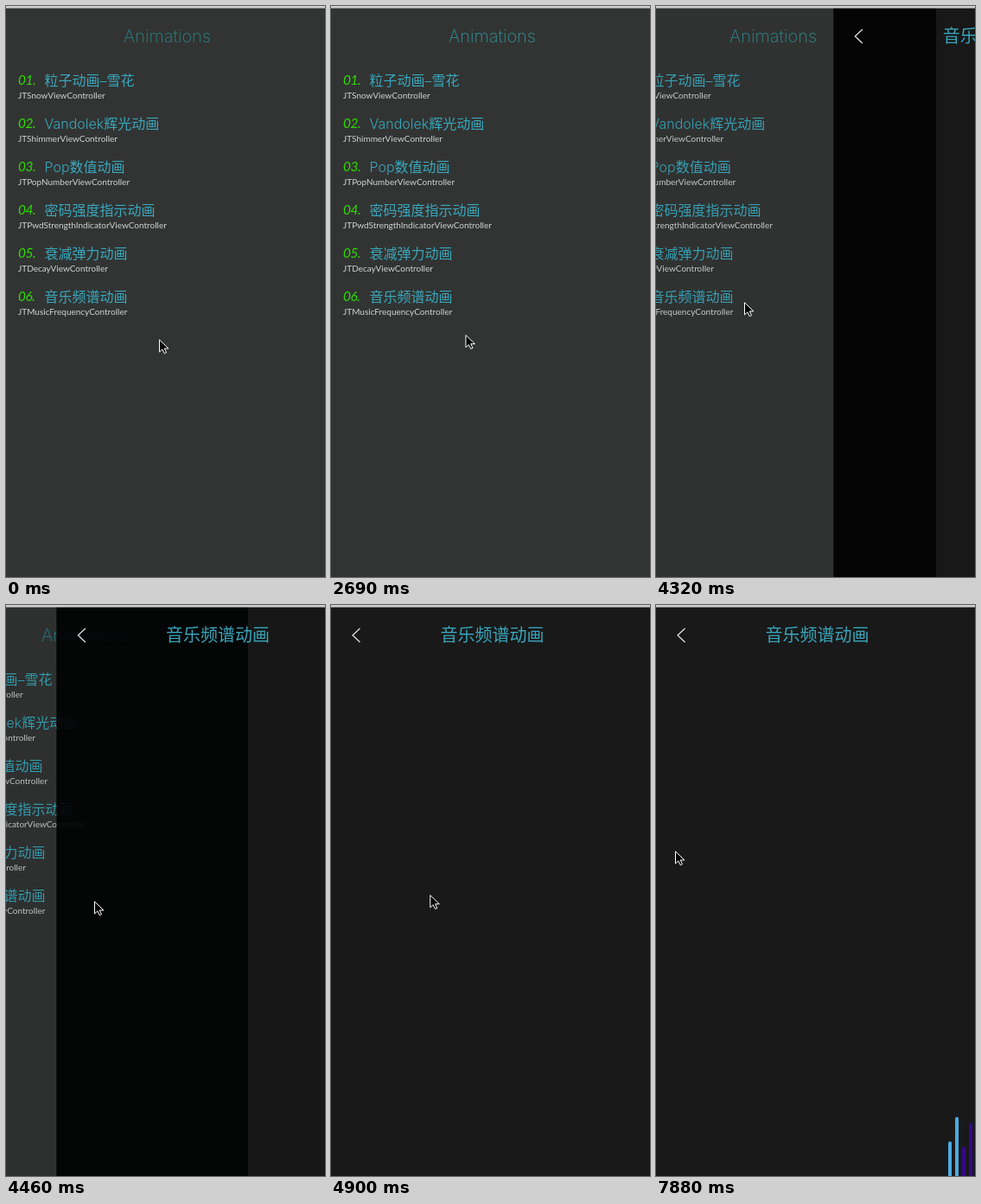
An HTML page for the animation above (8 s loop, 369 by 660 pixels).

```html
<!DOCTYPE html>
<html lang="zh">
<head>
<meta charset="utf-8">
<title>Animations</title>
<style>
  html, body { margin: 0; width: 100%; height: 100%; overflow: hidden; background: #1a1a1a; }
  svg { display: block; width: 100vw; height: 100vh; }
  text { font-family: Inter, "Noto Sans CJK SC", "Noto Sans CJK", sans-serif; font-weight: 300; white-space: pre; }
  .title { font-size: 20px; text-anchor: middle; }
  #heading { font-weight: 200; }
  .name { font-size: 16px; fill: #38a8bd; }
  .num { font: italic 400 15.5px Lato, sans-serif; letter-spacing: -.5px; fill: #2fdc00; }
  .sub { font: 400 10px Lato, sans-serif; fill: #d2d4d3; }
</style>
</head>
<body>
<svg viewBox="0 0 369 660" preserveAspectRatio="none">
  <rect width="369" height="660" fill="#fff"/>
  <g id="list">
    <rect width="375" height="660" fill="#323433"/>
    <text id="heading" class="title" x="186.5" y="42">Animations</text>
  </g>
  <rect id="dim" width="369" height="660"/>
  <g id="page">
    <rect width="375" height="660" fill="#000" fill-opacity=".9"/>
    <path d="M33.5 27L25 35L33.5 43" fill="none" stroke="#e4e6e5" stroke-width="1.2"/>
    <text class="title" x="186.5" y="42" fill="#38a5ba">音乐频谱动画</text>
    <g id="bars"></g>
  </g>
  <rect width="369" height="2.6" fill="#cccfcd"/>
  <path id="cursor" d="M.5 .8V14.9L3.9 11.8L6.2 16.6L8.5 15.6L6.3 10.9H11Z" fill="#050505" stroke="#fff" stroke-width="1"/>
</svg>
<script>
const LOOP = 8000, WIDTH = 375;
const $ = id => document.getElementById(id);
const progress = (t, from, to) => Math.max(0, Math.min(1, (t - from) / (to - from)));
const smooth = v => v * v * (3 - 2 * v);
const mix = (a, b, k) => a + (b - a) * k;
const blend = (a, b, k) => `rgb(${a.map((v, i) => Math.round(mix(v, b[i], k)))})`;

function add(parent, tag, attrs, text) {
  const el = document.createElementNS('http://www.w3.org/2000/svg', tag);
  for (const key in attrs) el.setAttribute(key, attrs[key]);
  if (text) el.textContent = text;
  parent.appendChild(el);
  return el;
}

const rows = [
  ['粒子动画–雪花', 'JTSnowViewController'],
  ['Vandolek辉光动画', 'JTShimmerViewController'],
  ['Pop数值动画', 'JTPopNumberViewController'],
  ['密码强度指示动画', 'JTPwdStrengthIndicatorViewController'],
  ['衰减弹力动画', 'JTDecayViewController'],
  ['音乐频谱动画', 'JTMusicFrequencyController']
];
rows.forEach(([name, sub], i) => {
  const y = 50 * i;
  add($('list'), 'text', { class: 'num', x: 14, y: y + 91 }, `0${i + 1}.`);
  add($('list'), 'text', { class: 'name', x: 44.5, y: y + 91.5 }, name);
  add($('list'), 'text', { class: 'sub', x: 14, y: y + 106.5 }, sub);
});

const bars = [0, 1, 2, 3].map(i =>
  add($('bars'), 'rect', { x: 362 - 8 * i, width: 4, rx: 2 }));
const BAR_START = 5945, BAR_DELAY = 600;
const BLUE = [76, 170, 226], PURPLE = [52, 8, 140];
const TEAL = [42, 132, 136], GLOW = [50, 160, 168];

// Pointer moves: start, end, x, y; it rests in between
const moves = [
  [300, 900, 177, 478], [900, 1400, 177, 416], [1560, 1800, 166, 400],
  [2000, 3580, 140, 350], [3580, 4020, 102, 342], [4700, 5350, 156, 310],
  [5350, 5500, 142, 296], [7000, 7880, 22, 284]
];

function pointerAt(t) {
  let x = 177, y = 385;
  for (const [from, to, toX, toY] of moves) {
    const k = smooth(progress(t, from, to));
    x = mix(x, toX, k);
    y = mix(y, toY, k);
  }
  return [x, y];
}

function drawHeading(t) {
  // Glows for 900 ms in every 1600 ms
  const phase = Math.min(1, ((t + 1150) % 1600) / 900);
  $('heading').setAttribute('fill', blend(TEAL, GLOW, Math.sin(Math.PI * phase) ** 2));
}

function drawPush(t) {
  const k = progress(t, 4230, 4730);
  const push = 1 - (1 - k) ** 3;
  const done = k === 1;
  $('list').setAttribute('transform', `translate(${-0.3 * WIDTH * push})`);
  $('list').setAttribute('visibility', done ? 'hidden' : 'visible');
  $('dim').setAttribute('opacity', done ? 0 : 0.1 * push);
  $('page').setAttribute('transform', `translate(${WIDTH * (1 - push)})`);
}

// Every bar swings alike, each one later than the bar to its right
function drawBar(bar, age) {
  const swing = Math.cos(2 * Math.PI * (age - 670) / 1500);
  const height = (51 + 18 * swing) * progress(age, 0, 100);
  bar.setAttribute('visibility', age > 0 ? 'visible' : 'hidden');
  bar.setAttribute('y', 660 - height);
  bar.setAttribute('height', height + 6);
  bar.setAttribute('fill', blend(BLUE, PURPLE, smooth(progress(age, 735, 1335))));
}

function draw(t) {
  drawHeading(t);
  drawPush(t);
  bars.forEach((bar, i) => drawBar(bar, t - BAR_START - BAR_DELAY * i));
  $('cursor').setAttribute('transform', `translate(${pointerAt(t)})`);
}

const start = performance.now();
function tick(now) {
  draw(Math.max(0, now - start) % LOOP);
  requestAnimationFrame(tick);
}
draw(0);
requestAnimationFrame(tick);
</script>
</body>
</html>
```
